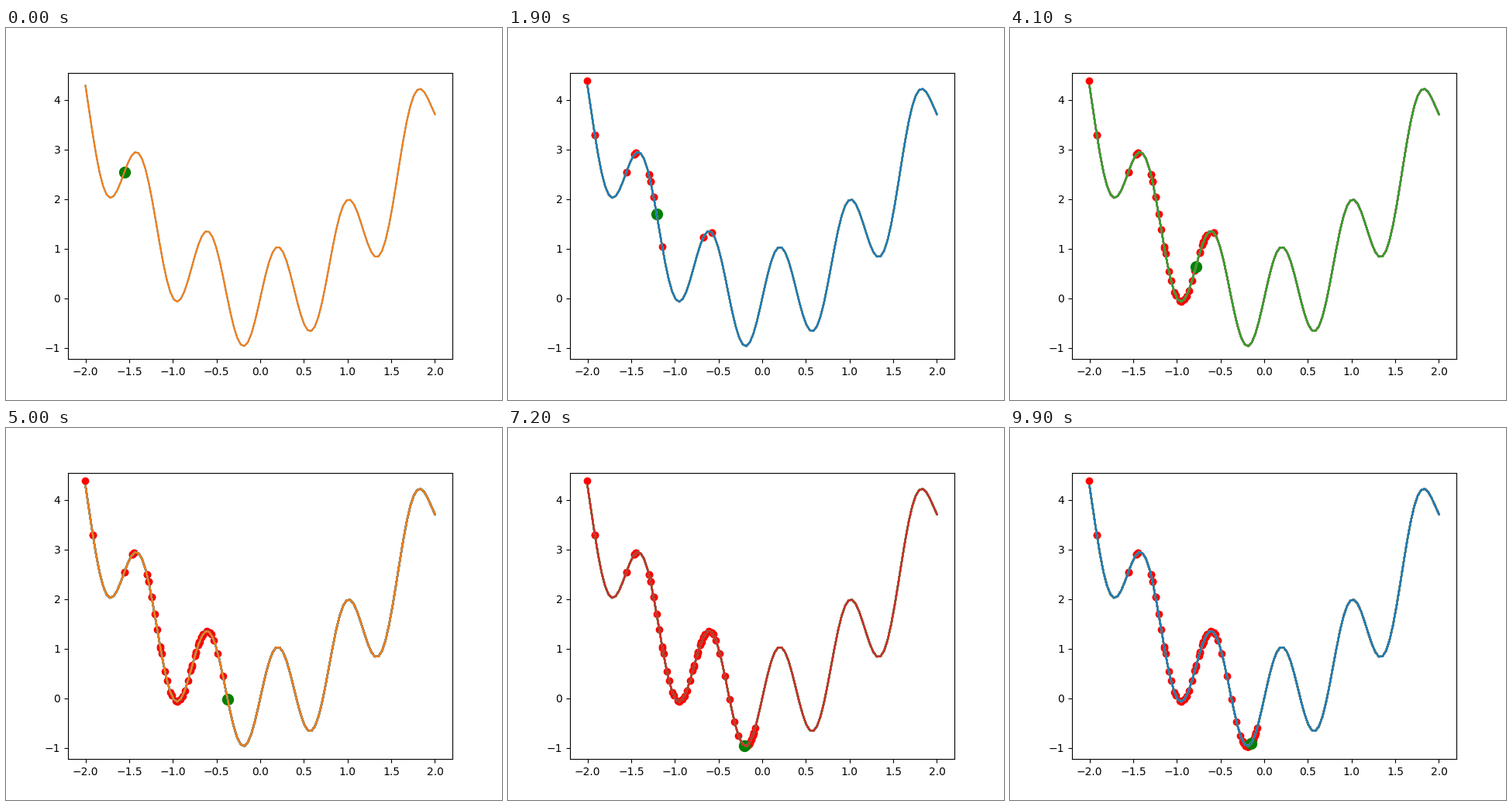
Write a matplotlib script that moves like this. It is 640 px wide and 480 px high and loops after 10 s.

```python
import numpy as np
import matplotlib.pyplot as plt
from matplotlib.animation import FuncAnimation

FRAMES = 100
HOT = 19          # steps of wide hopping before the slow drift
REJECTED = -2.008  # first proposal, shown but never accepted
rng = np.random.default_rng(4)


def f(x):
    return x ** 2 + np.sin(8 * x)


def points(x):
    return np.column_stack([x, f(x)])


# Hot phase: each accepted hop is held for two steps.
hops = [-1.555, -1.915, -1.464, -1.442, -1.297,
        -1.279, -1.243, -0.675, -0.577, -1.144]
hot = np.repeat(hops, 2)[:HOT]

# Cooling phase: drift through turning points with a little jitter.
turns = {19: -1.208, 38: -0.66, 41: -0.783, 47: -0.53, 53: -0.222,
         60: -0.08, 68: -0.19, 72: -0.205, 75: -0.245, 82: -0.21, 99: -0.15}
steps = np.arange(HOT, FRAMES)
cool = np.interp(steps, list(turns), list(turns.values()))
cool += rng.uniform(-0.01, 0.01, len(steps)) * ~np.isin(steps, list(turns))

walk = points(np.concatenate([hot, cool]))
rejected = points(np.array([REJECTED]))

fig, ax = plt.subplots(figsize=(6.4, 4.8), dpi=100)

# The curve is plotted again on every step, in the next cycle colour.
xs = np.linspace(-2, 2, 100)
curves = [ax.plot(xs, f(xs), color=f"C{i % 10}")[0] for i in range(FRAMES + 1)]
ax.set_xlim(ax.get_xlim())
ax.set_ylim(ax.get_ylim())

trail = ax.scatter([], [], c="red")
current = ax.scatter([], [], s=100, c="green")


def update(n):
    for i, curve in enumerate(curves):
        curve.set_visible(i <= n + 1)
    trail.set_offsets(np.vstack([rejected, walk[:n]]))
    trail.set_visible(n > 0)
    current.set_offsets(walk[n:n + 1])
    return [trail, current, *curves]


anim = FuncAnimation(fig, update, frames=FRAMES, interval=100,
                     repeat=True, repeat_delay=0)
plt.show()
```
